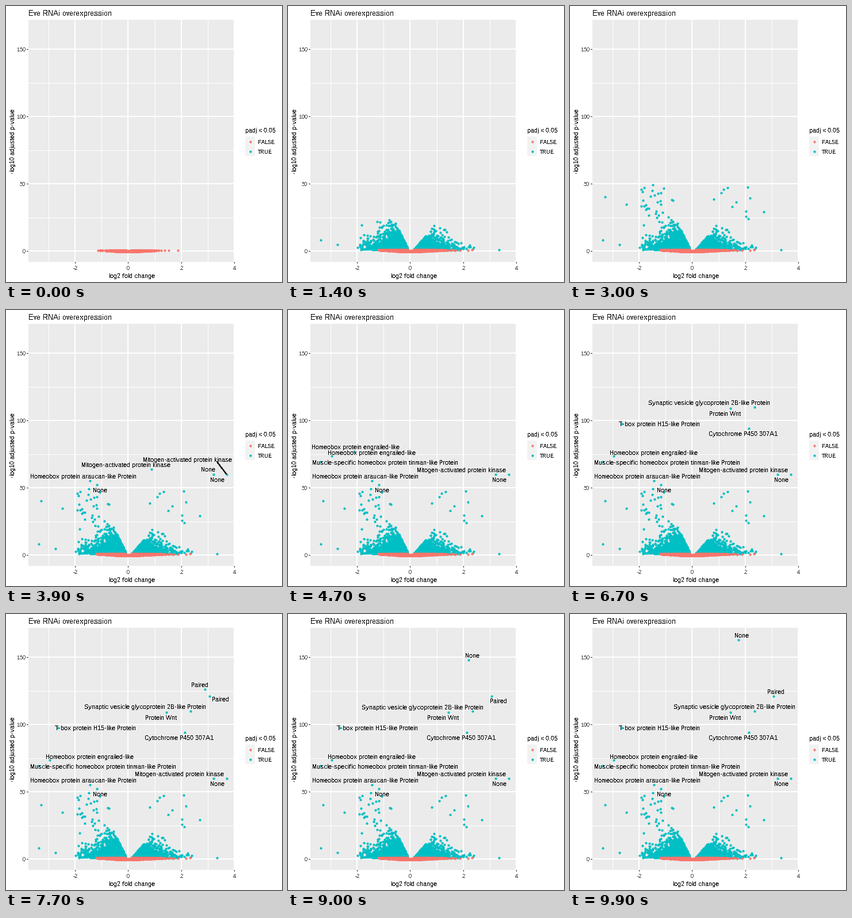
Animation, 480 px wide and 480 px high, one loop 10 s. Source, as a matplotlib script:

```python
import numpy as np
import matplotlib.pyplot as plt
from matplotlib.animation import FuncAnimation
from matplotlib.patches import Rectangle

SIZE, DPI, FRAMES = 480, 100, 100
PX = 72 / DPI
RED, TEAL = "#F8766D", "#00BFC4"
LEFT, RIGHT, TOP, BOTTOM = 39, 398, 24, 445
X0, Y0, XU, YU = 212.8, 426.5, 46.2, 2.34
PEAK = 44

# Crisp, fully hinted text
plt.rcParams.update({"font.family": "Liberation Sans", "text.antialiased": False,
                     "text.hinting": "native", "text.hinting_factor": 1})
fig = plt.figure(figsize=(SIZE / DPI, SIZE / DPI), dpi=DPI, facecolor="white")
ax = fig.add_axes([0, 0, 1, 1])
ax.set_xlim(0, SIZE)
ax.set_ylim(SIZE, 0)
ax.axis("off")
rng = np.random.default_rng(7)


def box(x, y, w, h, color, z=0):
    ax.add_patch(Rectangle((x, y), w, h, fc=color, lw=0, antialiased=False, zorder=z))


def text(x, y, s, size=11, color="black", **kw):
    return ax.text(x, y, s, fontsize=size * PX, color=color, zorder=6, **kw)


def snap(pts):
    return np.floor(pts) + 0.5


def dots(pts, color, z):
    return ax.scatter(*snap(pts).T, s=(4.2 * PX) ** 2, c=color, linewidths=0,
                      antialiased=False, zorder=z)


def birth(y):
    """Frame in which a point at stage height y appears."""
    return np.round((Y0 - np.asarray(y)) / (Y0 - PEAK) * (FRAMES - 1))


def to_stage(x, y):
    return np.column_stack([X0 + XU * x, Y0 - YU * y])


# Panel, grid, ticks
box(LEFT, TOP, RIGHT - LEFT, BOTTOM - TOP, "#EBEBEB")
for minor in (True, False):
    w = 1 if minor else 2
    for v in range(-3 if minor else -2, 5, 2):
        x = int(X0 + XU * v)
        box(x + 1 - w, TOP, w, BOTTOM - TOP, "white", 1)
        if not minor:
            box(x, BOTTOM, 1, 3, "#333333", 1)
            text(x + 0.5, 459, str(v), 9, "#4D4D4D", ha="center")
    for v in range(25 if minor else 0, 151, 50):
        y = int(Y0 - YU * v)
        box(LEFT, y + 1 - w, RIGHT - LEFT, w, "white", 1)
        if not minor:
            box(LEFT - 3, y, 3, 1, "#333333", 1)
            text(34, y + 4, str(v), 9, "#4D4D4D", ha="right")

# Titles and legend
text(39, 17, "Eve RNAi overexpression", 13)
text(219, 473, "log2 fold change", ha="center")
text(12.5, 235, "-log10 adjusted p-value", ha="center", va="center", rotation=90)
text(416, 220, "padj < 0.05")
box(416, 227, 17, 34, "#F2F2F2")
for y, name, color in ((235, "FALSE", RED), (252, "TRUE", TEAL)):
    dots(np.array([[424, y]]), color, 3)
    text(438, y + 5, name, 9)

MAPK = "Mitogen-activated protein kinase"
# name, x, y, then label places as (from frame, x, y)
GENES = [
    ("None", 157, 303, [(32, 163.5, 313)]),
    ("Homeobox protein araucan-like Protein", 145, 296, [(34, 135, 289)]),
    (MAPK, 383, 285, [(37, 301.5, 278), (38, 315.5, 260), (42, 301.5, 278)]),
    ("None", 360, 285, [(37, 367.5, 295)]),
    ("Muscle-specific homeobox protein tinman-like Protein", 56, 263.5,
     [(42, 169, 265)]),
    ("Homeobox protein engrailed-like", 75, 253, [(45, 145.5, 248)]),
    ("Cytochrome P450 307A1", 310, 205, [(57, 315, 198), (59, 301, 215)]),
    ("T-box protein H15-like Protein", 89, 197.5, [(59, 155.5, 198)]),
    ("Protein Wnt", 278, 170, [(66, 269.5, 180)]),
    ("Synaptic vesicle glycoprotein 2B-like Protein", 320, 168,
     [(67, 242, 161), (84, 234, 162), (95, 286, 161)]),
    ("Paired", 353, 142, [(74, 373, 148), (84, 366, 151), (95, 358, 135)]),
    ("None", 292, PEAK, [(99, 298.5, 37)]),
]
# Lone points far from the cloud
STRAYS = [(143, 310), (60, 331), (97, 344), (56, 406), (85, 414),
          (273, 315), (308, 314), (312, 333), (336, 357), (366, 423)]


def wing(side, n, spread, reach, slope):
    """One arm of the volcano: exponential heights cut by a steep inner wall."""
    a = 0.1 + rng.gamma(1.9, spread, n)
    y = 1.3 + rng.exponential(reach, n) * np.where(a > 1.3, 0.75, 1)
    ok = (y < slope * (a - 0.06)) & (y < 24) & (a < 2.6 - 0.6 * (side < 0))
    return to_stage(side * a[ok], y[ok])


def high(lo, hi, n):
    """Sparse points above the cloud, thinning out upwards."""
    return to_stage(rng.uniform(lo, hi, n), 24 + 24 * rng.random(n) ** 1.4)


def flat_band():
    """Points under the threshold; their lower edge bends up at the sides."""
    x = 0.34 * rng.standard_t(5, 2800)
    x = x[(x > -1.3) & (x < 2.4)]
    low = np.minimum(0.6 * x ** 2, 0.7)
    roof = 1.3 * np.minimum(1, np.abs(x) / 0.15)
    return to_stage(x, low + np.maximum(roof - low, 0) * rng.random(x.size))


teal = np.vstack([wing(-1, 1900, 0.27, 4.7, 42), wing(1, 1250, 0.28, 3.7, 24),
                  high(-1.95, -0.65, 28), high(0.8, 2.2, 8),
                  STRAYS, [g[1:3] for g in GENES]])
red = flat_band()
layers = [(dots(teal, TEAL, 3), snap(teal), birth(teal[:, 1])),
          (dots(red, RED, 4), snap(red), birth(red[:, 1]))]
head = dots(np.array([[-9.0, -9.0]]), TEAL, 3)
pointer, = ax.plot([367, 383], [264, 285], color="black", lw=PX,
                   antialiased=False, zorder=5)

# Stops of the travelling point; genes sharing a frame make one stop
STOPS = [("", *STRAYS[0])]
for gene in GENES:
    if birth(gene[2]) > birth(STOPS[-1][2]):
        STOPS.append(gene[:3])
TIMES = birth([s[2] for s in STOPS])


def measure(s):
    t = text(0, 0, s)
    w = t.get_window_extent().width
    t.remove()
    return w


WIDTH = {g[0]: measure(g[0]) for g in GENES}
shown = []


def travelling(i):
    """Position, name and progress of the point gliding between two stops."""
    if i <= TIMES[0] or i in TIMES:
        return None
    k = np.searchsorted(TIMES, i)
    f = (i - TIMES[k - 1]) / (TIMES[k] - TIMES[k - 1])
    (n0, x0, y0), (n1, x1, y1) = STOPS[k - 1:k + 1]
    return x0 + f * (x1 - x0), y0 + f * (y1 - y0), n0 if f < 0.5 else n1, f


def free_spot(name, x, y, f, placed):
    """Place a label above its point, inside the panel, clear of the others."""
    w = WIDTH[name]
    x += (0.28 if f > 0.5 else -0.28) * w
    x = min(max(x, 41 + w / 2), 393 - w / 2)
    y -= 7
    while any(abs(y - b) < 8 and abs(x - a) < (w + WIDTH[n]) / 2
              for n, a, b in placed):
        y -= 3
    return name, x, y


def update(i):
    for art, pts, born in layers:
        art.set_offsets(pts[born <= i])
    labels = []
    for name, _, _, places in GENES:
        past = [p for p in places if p[0] <= i]
        if past:
            labels.append((name, *past[-1][1:]))
    # The second kinase point lingers until the next stop
    crowded = 38 <= i <= 41
    pointer.set_visible(crowded)
    if crowded:
        labels.append(("None", 351.5, 277))
    move = travelling(i)
    head.set_visible(move is not None)
    if move:
        x, y, name, f = move
        head.set_offsets(snap([[x, y]]))
        if name:
            labels.append(free_spot(name, x, y, f, labels))
    while shown:
        shown.pop().remove()
    shown.extend(text(x, y + 4, s, ha="center") for s, x, y in labels)
    return []


anim = FuncAnimation(fig, update, frames=FRAMES, interval=100, repeat=True,
                     repeat_delay=0, blit=False, cache_frame_data=False)
plt.show()
```
